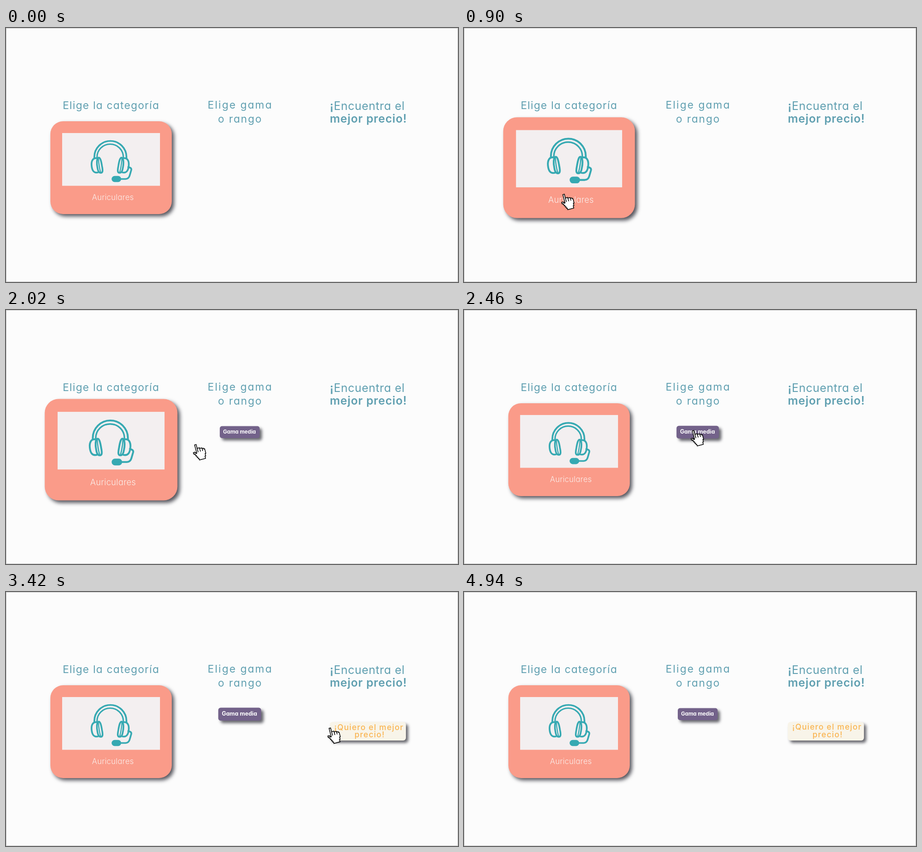
An HTML page that plays this animation: 998 px wide and 561 px high, repeating every 5540 ms.

```html
<!DOCTYPE html>
<html lang="es">
<head>
<meta charset="utf-8">
<title>Elige y encuentra</title>
<style>
  html, body { margin: 0; width: 100%; height: 100%; overflow: hidden; background: #fcfcfc; }
  svg { display: block; width: 998px; height: 561px; }
  text { font-family: Inter, "Open Sans", sans-serif; font-feature-settings: "cv11" 1; text-anchor: middle; }
  .title { fill: #5f9fb0; font-size: 23px; font-weight: 400; }
  .end { font-size: 25px; text-anchor: start; }
  .label { fill: #fbeeea; font-size: 17px; font-weight: 300; letter-spacing: .25px; }
  .chip { fill: #fff; font-size: 11.7px; font-weight: 700; }
  .offer { fill: #f9b450; font-size: 17.5px; font-weight: 500; letter-spacing: 1.3px; }
  .big { filter: drop-shadow(5px 5px 4px rgba(30, 30, 40, .75)); }
  .small { filter: drop-shadow(5px 5px 3px rgba(20, 20, 30, .65)); }
  .icon { fill: none; stroke: #36a9b2; stroke-width: 3.7; stroke-linecap: round; stroke-linejoin: round; }
</style>
</head>
<body>
<svg viewBox="0 0 998 561">
  <defs>
    <g id="cup">
      <path d="M202 288C192 285 188 294 189 304C190 315 194 321 203 319"/>
      <path d="M204 286.500C200 289 200 300 202 309C203 316 205 320 209 320C214 320 214 315 212 305C210 293 208 285 204 286.500Z"/>
      <path d="M204 288Q205 305 209 319" stroke-width="2.400"/>
    </g>
  </defs>

  <rect x=".5" y=".5" width="997" height="560" fill="#fcfcfc" stroke="#bdbdbd"/>

  <text class="title" x="232" y="179" letter-spacing="1.35">Elige la categoría</text>
  <text class="title" x="517" y="178" letter-spacing="2.2">Elige gama</text>
  <text class="title" x="517" y="209" letter-spacing="2">o rango</text>
  <text class="title end" x="715" y="181" letter-spacing=".7"><tspan font-weight="600">¡</tspan>Encuentra el</text>
  <text class="title end" x="715" y="209" letter-spacing=".85" style="font-weight:600">mejor precio!</text>

  <g id="card">
    <rect class="big" x="98" y="206" width="268" height="205" rx="28" fill="#fa9b89"/>
    <rect x="124" y="232" width="216" height="116.500" fill="#f3eff0"/>
    <g class="icon">
      <path d="M195 288V285A35.500 35.500 0 0 1 266 285V288"/>
      <path d="M201 287V285A29 28.500 0 0 1 259 285V287" stroke-width="3.200"/>
      <use href="#cup"/>
      <use href="#cup" transform="matrix(-1 0 0 1 460 0)"/>
      <path d="M270 307L274 308.500Q277.500 310 276.500 314L273 326Q271 333 264 333.500H252"/>
      <rect x="235" y="328.500" width="17.500" height="10" rx="5" fill="#36a9b2"/>
    </g>
    <text class="label" x="236" y="380">Auriculares</text>
  </g>

  <g id="range">
    <rect class="small" x="472" y="256.500" width="88" height="26.500" rx="5" fill="#73628a"/>
    <text class="chip" x="515.500" y="273">Gama media</text>
  </g>

  <g id="price">
    <rect class="small" x="715" y="287" width="168" height="41" rx="6" fill="#f8f4e9"/>
    <rect id="glow" x="715" y="287" width="168" height="41" rx="6" fill="#fff"/>
    <text class="offer" x="801.500" y="304.500">¡Quiero el mejor</text>
    <text class="offer" x="803" y="321">precio!</text>
  </g>

  <g id="hand">
    <g transform="rotate(-15) scale(1.75) translate(-6 -1.300)" fill="#fff" stroke="#000" stroke-width=".9">
      <path d="M5 1H7V6H10V7H13V8H15V9H16V15H15V18H14V21H6V19H5V17H4V15H3V13H2V12H1V10H3V11H4V12H5Z"/>
      <path d="M7 6V11M10 7V11M13 8V11" fill="none"/>
    </g>
  </g>
</svg>
<script>
  const LOOP = 5540;
  const $ = id => document.getElementById(id);
  const span = (t, from, to) => Math.min(1, Math.max(0, (t - from) / (to - from)));
  const inOut = u => u < .5 ? 4 * u ** 3 : 1 - 4 * (1 - u) ** 3;
  const outExpo = u => u >= 1 ? 1 : 1 - 2 ** (-10 * u);

  // start, end, destination of the pointer
  const home = [-35, 480];
  const moves = [
    [350, 700, 220, 368],
    [1653, 2293, 506, 267],
    [3040, 3680, 790.5, 313.5],
    [4450, 4950, 1025, 339]
  ];

  // centre, hover scale, hover on/off times, fade-in times
  const tiles = [
    { id: 'card', x: 232, y: 308.5, grow: .093, on: 690, off: 2060 },
    { id: 'range', x: 516, y: 269.7, grow: .076, on: 2300, off: 3440, fade: [1180, 1570] },
    { id: 'price', x: 799, y: 307.5, grow: .09, on: 3680, off: 4560, fade: [2660, 3000] }
  ];

  const hover = (t, { on, off }) =>
    outExpo(span(t, on, on + 600)) - outExpo(span(t, off, off + 600));

  function pointer(t) {
    let [x, y] = home;
    for (const [from, to, nx, ny] of moves) {
      const k = inOut(span(t, from, to));
      x += (nx - x) * k;
      y += (ny - y) * k;
    }
    return [x, y];
  }

  function draw(t) {
    for (const tile of tiles) {
      const { id, x, y, grow, fade } = tile;
      const h = hover(t, tile);
      $(id).setAttribute('transform',
        `translate(${x} ${y}) scale(${1 + grow * h}) translate(${-x} ${-y})`);
      if (fade) $(id).setAttribute('opacity', span(t, ...fade));
      if (id === 'price') $('glow').setAttribute('opacity', .4 * h);
    }
    $('hand').setAttribute('transform', `translate(${pointer(t)})`);
  }

  const start = performance.now();
  function tick() {
    draw((performance.now() - start) % LOOP);
    requestAnimationFrame(tick);
  }
  tick();
</script>
</body>
</html>
```
